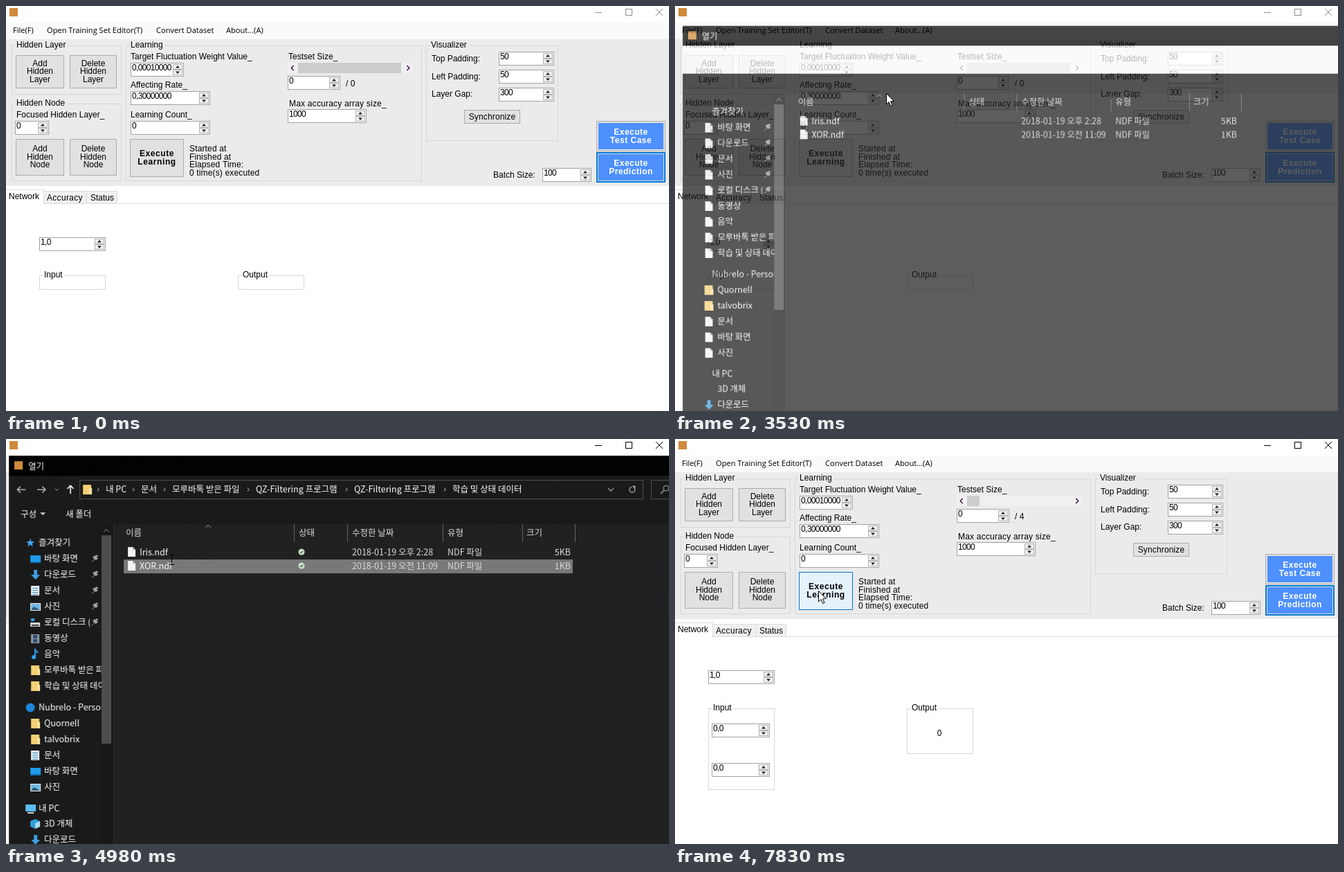
These frames come from a looping animation (958 px wide and 585 px high, 8000 ms). An HTML page with a canvas:

```html
<!DOCTYPE html>
<html lang="ko">
<head>
<meta charset="utf-8">
<title>Trainer</title>
<style>
html, body { margin: 0; width: 100%; height: 100%; overflow: hidden; background: #fff; }
canvas { display: block; }
</style>
</head>
<body>
<canvas id="stage" width="958" height="585"></canvas>
<script>
const LOOP = 8000;
const stage = document.getElementById('stage').getContext('2d');
const sheet = document.createElement('canvas');
sheet.width = 1240;
sheet.height = 760;
const pane = sheet.getContext('2d');
let g = stage;

const FORM = '"Liberation Sans", Arial, sans-serif';
const MENU = '"Open Sans", "Noto Sans", sans-serif';
const KOR = '"Noto Sans CJK KR", "Noto Sans CJK JP", "Noto Sans CJK", sans-serif';
const BLUE = '#0078d7';

// ---------- drawing helpers ----------
function text(s, x, y, o = {}) {
  const size = o.size || 12;
  g.font = `${o.weight || 400} ${size}px ${o.face || FORM}`;
  g.letterSpacing = (o.gap || 0) + 'px';
  g.textAlign = o.align || 'left';
  g.textBaseline = 'alphabetic';
  g.fillStyle = o.color || '#000';
  g.fillText(s, x, y + size * 0.36);
}
const menuText = (s, x, y) => text(s, x, y, { face: MENU, size: 11.1 });
const korText = (s, x, y, color = '#fff', align) => text(s, x, y, { face: KOR, size: 12.5, color, align });

function fill(x, y, w, h, color) {
  g.fillStyle = color;
  g.fillRect(x, y, w, h);
}
function frame(x, y, w, h, color) {
  g.strokeStyle = color;
  g.lineWidth = 1;
  g.strokeRect(x + 0.5, y + 0.5, w - 1, h - 1);
}
function poly(points, color) {
  g.beginPath();
  points.forEach(([x, y]) => g.lineTo(x, y));
  g.closePath();
  g.fillStyle = color;
  g.fill();
}
function path(points, color, width = 1) {
  g.beginPath();
  points.forEach(([x, y]) => g.lineTo(x, y));
  g.strokeStyle = color;
  g.lineWidth = width;
  g.stroke();
}
function disc(x, y, r, color) {
  g.beginPath();
  g.arc(x, y, r, 0, 7);
  g.fillStyle = color;
  g.fill();
}
// dx, dy: direction the chevron points to
function chevron(x, y, dx, dy, r, color, width = 1) {
  path([[x - dx * r / 2 - dy * r, y - dy * r / 2 - dx * r],
        [x + dx * r / 2, y + dy * r / 2],
        [x - dx * r / 2 + dy * r, y - dy * r / 2 + dx * r]], color, width);
}

const clamp = v => Math.min(1, Math.max(0, v));
const span = (t, from, to) => clamp((t - from) / (to - from));
const inside = (p, x, y, w, h) => p && p.x >= x && p.x < x + w && p.y >= y && p.y < y + h;

// ---------- pointer ----------
const track = [
  [160, 891, 588], [520, 470, 300], [860, 66, 80], [930, 62, 50], [1000, 62, 50],
  [1200, 66, 56], [1500, 60, 59], [1770, 32, 37], [1900, 32, 38], [2390, 78, 73],
  [2850, 78, 73], [2930, 75, 62], [3140, 75, 62], [3460, 300, 124], [3530, 305, 126],
  [3870, 232, 189], [4000, 232, 189], [4160, 238, 176], [4450, 238, 176], [4570, 239, 177],
  [5180, 239, 178], [5400, 289, 214], [5650, 289, 214], [5930, 424, 333], [6140, 424, 333],
  [6240, 456, 320], [6340, 491, 337], [6630, 491, 337], [6980, 890, 205], [7120, 888, 200],
  [7430, 818, 222], [7470, 818, 222], [7830, 207, 219], [8000, 207, 219]
];
const clicks = [970, 1820, 3100, 4820];

function slope(i, k) {
  const a = track[i - 1], b = track[i], c = track[i + 1];
  if (!a || !c || (b[k] - a[k]) * (c[k] - b[k]) <= 0) return 0;
  return (c[k] - a[k]) / (c[0] - a[0]);
}
function pointer(t) {
  if (t < 160) return null;
  let i = 0;
  while (i < track.length - 2 && t >= track[i + 1][0]) i++;
  const a = track[i], b = track[i + 1], d = b[0] - a[0], u = span(t, a[0], b[0]);
  const at = k => {
    const ease = u * u * (3 - 2 * u);
    return a[k] + (b[k] - a[k]) * ease
      + d * u * (1 - u) * (slope(i, k) * (1 - u) - slope(i + 1, k) * u);
  };
  return { x: at(1), y: at(2) };
}
function drawPointer(t, p, beam) {
  if (clicks.some(c => t >= c && t < c + 160)) disc(p.x, p.y, 11, 'rgba(255,215,0,.55)');
  g.save();
  g.translate(Math.round(p.x), Math.round(p.y));
  if (beam) {
    path([[-3, -6.5], [0.5, -6.5], [0.5, 7.5], [-3, 7.5]], '#000');
    path([[4, -6.5], [0.5, -6.5], [0.5, 7.5], [4, 7.5]], '#000');
  } else {
    const arrow = [[0.5, 0.5], [0.5, 16], [4, 12.6], [6.6, 18.5], [9, 17.5], [6.5, 11.8], [11.3, 11.5], [0.5, 0.5]];
    poly(arrow, '#fff');
    path(arrow, '#000');
  }
  g.restore();
}

// ---------- form controls ----------
function group(title, x, y, w, h, titleWidth, back) {
  frame(x, y, w, h, '#d8d8d8');
  fill(x + 6, y - 1, titleWidth + 3, 3, back);
  text(title, x + 7, y - 1);
}
function button(lines, x, y, w, h, ys, hover, o = {}) {
  fill(x, y, w, h, hover ? '#e5f1fb' : '#e1e1e1');
  frame(x, y, w, h, hover ? BLUE : '#adadad');
  lines.forEach((s, i) => text(s, x + w / 2, ys[i], { align: 'center', ...o }));
}
function blueButton(lines, y, ys, border, width) {
  fill(853, y, 100, 44, border);
  fill(853 + width, y + width, 100 - 2 * width, 44 - 2 * width, '#e1e1e1');
  fill(856, y + 3, 94, 38, '#4d90fe');
  lines.forEach((s, i) => text(s, 903, ys[i], { align: 'center', color: '#fff', weight: 700, gap: 0.5 }));
}
function field(value, x, y, w) {
  const h = 20, sx = x + w - 16;
  fill(x, y, w, h, '#fff');
  frame(x, y, w, h, '#a2a2a2');
  text(value, x + 2, y + 7, { gap: -0.65 });
  [2, 10].forEach((dy, i) => {
    fill(sx, y + dy, 14, 8, '#f0f0f0');
    frame(sx, y + dy, 14, 8, '#b4b4b4');
    const mx = sx + 7, my = y + dy + 4, d = i ? 1 : -1;
    poly([[mx - 3, my - d * 1.5], [mx + 3, my - d * 1.5], [mx, my + d * 2]], '#222');
  });
}
const fields = [
  ['0', 13, 166, 49], ['0,00010000', 180, 82, 77], ['0,30000000', 180, 123, 115],
  ['0', 180, 166, 115], ['0', 407, 101, 76], ['1000', 407, 149, 114],
  ['50', 712, 66, 80], ['50', 712, 92, 80], ['300', 712, 118, 80],
  ['100', 775, 234, 71], ['1,0', 48, 334, 96]
];
const inputs = [['0,0', 53, 411, 84], ['0,0', 53, 468, 84]];

function tab(label, x, y, w, h, back, tx, ty, gap) {
  fill(x, y, w, h, back);
  frame(x, y, w, h, '#dcdcdc');
  text(label, tx, ty, { gap });
}
function appIcon(x, y) {
  fill(x, y, 12, 12, '#d08a3c');
}

function drawForm(active, loaded, p) {
  const back = '#ebebeb', ink = active ? '#000' : '#8c8c8c';
  fill(0, 0, 958, 585, '#fff');
  appIcon(5, 3);
  path([[851, 9.5], [861, 9.5]], ink);
  frame(895, 4, 10, 10, ink);
  path([[939, 4], [949, 14]], ink);
  path([[949, 4], [939, 14]], ink);

  fill(0, 24, 958, 24, '#fafafa');
  if (inside(p, 2, 26, 48, 20)) {
    fill(2, 26, 48, 20, '#b3d7f3');
    frame(2, 26, 48, 20, BLUE);
  }
  menuText('File(F)', 10, 35);
  menuText('Open Training Set Editor(T)', 59, 35);
  menuText('Convert Dataset', 217, 35);
  menuText('About...(A)', 318, 35);

  fill(0, 48, 958, 212, back);
  group('Hidden Layer', 8, 57, 159, 71, 72, back);
  group('Hidden Node', 8, 141, 159, 112, 71, back);
  group('Learning', 173, 57, 428, 196, 48, back);
  group('Visualizer', 607, 57, 191, 138, 54, back);

  const pair = (verb, x, w, y, h, noun, ys) =>
    button([verb, 'Hidden', noun], x, y, w, h, ys, inside(p, x, y, w, h));
  for (const [verb, x, w] of [['Add', 14, 70], ['Delete', 92, 68]]) {
    pair(verb, x, w, 71, 48, 'Layer', [83, 94, 106]);
    pair(verb, x, w, 192, 53, 'Node', [206, 218, 229]);
  }
  button(['Execute', 'Learning'], 179, 192, 78, 55, [213, 225],
    inside(p, 179, 192, 78, 55), { weight: 700, gap: 0.6 });
  button(['Synchronize'], 662, 150, 81, 20, [160], inside(p, 662, 150, 81, 20), { gap: 0.15 });

  text('Focused Hidden Layer_', 15, 157);
  text('Target Fluctuation Weight Value_', 180, 73);
  text('Affecting Rate_', 180, 114);
  text('Learning Count_', 180, 157);
  text('Testset Size_', 408, 73);
  text('Max accuracy array size_', 409, 141, { gap: 0.2 });
  ['Started at', 'Finished at', 'Elapsed Time:', '0 time(s) executed']
    .forEach((s, i) => text(s, 265, 206 + i * 11.5, { gap: 0.15 }));
  text('Top Padding:', 615, 76);
  text('Left Padding:', 615, 102);
  text('Layer Gap:', 615, 127);
  text('Batch Size:', 704, 244);

  fill(407, 82, 181, 15, '#f0f0f0');
  fill(422, 82, loaded ? 18 : 149, 15, '#cdcdcd');
  chevron(414, 89.5, -1, 0, 3.5, '#4b1a4b', 1.6);
  chevron(581, 89.5, 1, 0, 3.5, '#4b1a4b', 1.6);
  text(loaded ? '/ 4' : '/ 0', 491, 112);

  const overTest = inside(p, 853, 166, 100, 44);
  blueButton(['Execute', 'Test Case'], 166, [182, 194], overTest ? BLUE : '#adadad', 1);
  blueButton(['Execute', 'Prediction'], 211, [227, 239], BLUE, 2);

  fill(0, 285, 958, 1, '#dcdcdc');
  tab('Accuracy', 54, 267, 63, 19, '#f0f0f0', 59, 277, 0.3);
  tab('Status', 116, 267, 45, 19, '#f0f0f0', 122, 277);
  tab('Network', -1, 265, 56, 22, '#fff', 4, 275);
  fill(0, 285, 54, 3, '#fff');

  group('Input', 48, 389, 96, loaded ? 118 : 21, 27, '#fff');
  group('Output', 335, 389, 96, loaded ? 66 : 21, 35, '#fff');
  if (loaded) text('0', 382, 425, { align: 'center' });
  fields.concat(loaded ? inputs : []).forEach(f => field(...f));
}

function drawMenu(p) {
  for (let i = 4; i > 0; i--) fill(4, 48, 179 + i, 91 + i, 'rgba(0,0,0,.07)');
  fill(2, 26, 49, 21, '#fdfdfd');
  frame(2, 26, 49, 21, '#808080');
  fill(2, 46, 181, 92, '#fdfdfd');
  frame(2, 46, 181, 92, '#808080');
  fill(3, 27, 47, 20, '#fdfdfd');
  fill(3, 47, 25, 90, '#f6f6f6');
  fill(33, 112, 148, 1, '#bdbdbd');
  const row = p.y < 46 ? -1 : p.y < 67 ? 0 : 1;
  if (row >= 0) {
    fill(4, 46 + row * 21, 178, 21, '#b3d7f3');
    frame(4, 46 + row * 21, 178, 21, BLUE);
  }
  menuText('File(F)', 10, 35);
  menuText('Open Training Set(O)', 36, 56);
  menuText('Open States Set', 36, 77);
  menuText('Save States Set', 36, 98);
  menuText('Exit(E)', 36, 125);
}

// ---------- file dialog ----------
const icons = {
  page(x, y) {
    poly([[x - 5, y - 7], [x + 2, y - 7], [x + 6, y - 3], [x + 6, y + 7], [x - 5, y + 7]], '#f4f4f4');
    poly([[x + 2, y - 7], [x + 6, y - 3], [x + 2, y - 3]], '#bdbdbd');
  },
  folder(x, y) {
    fill(x - 6, y - 7, 12, 14, '#f3cf74');
    fill(x + 3, y - 2, 4, 9, '#fbe3a0');
  },
  star(x, y) {
    poly(Array.from({ length: 10 }, (_, i) => {
      const a = i * Math.PI / 5, r = i % 2 ? 2.6 : 6.5;
      return [x + r * Math.sin(a), y - r * Math.cos(a)];
    }), '#3fa9f5');
  },
  desk(x, y) {
    fill(x - 7, y - 5, 15, 11, '#1e9be9');
    fill(x - 7, y + 4, 15, 2, '#0f6fb8');
  },
  down(x, y) {
    poly([[x - 2, y - 7], [x + 3, y - 7], [x + 3, y], [x + 7, y], [x + 0.5, y + 7], [x - 6, y], [x - 2, y]], '#3f9fe0');
  },
  doc(x, y) {
    fill(x - 6, y - 7, 12, 14, '#eef4f8');
    for (let i = 0; i < 4; i++) fill(x - 4, y - 4 + i * 3, 8, 1, '#2f7fae');
  },
  photo(x, y) {
    fill(x - 7, y - 5, 15, 11, '#f2f2f2');
    fill(x - 6, y - 4, 13, 9, '#6db7e4');
    poly([[x - 6, y + 5], [x - 2, y], [x + 7, y + 5]], '#2a566f');
  },
  disk(x, y) {
    fill(x - 7, y, 14, 6, '#d5d9dc');
    fill(x - 5, y + 3, 10, 2, '#3b4248');
    fill(x - 6, y - 6, 5, 4, '#33a3ea');
  },
  film(x, y) {
    fill(x - 6, y - 6, 12, 13, '#8d99a3');
    fill(x - 3, y - 5, 6, 5, '#2c4d74');
    fill(x - 3, y + 1, 6, 5, '#2c4d74');
  },
  note(x, y) {
    disc(x - 2, y + 4, 3, '#2fa0ee');
    path([[x, y + 4], [x, y - 7], [x + 4, y - 2]], '#2fa0ee', 2);
  },
  ball(x, y) { disc(x, y, 6.5, '#1d86d8'); },
  screen(x, y) {
    fill(x - 7, y - 6, 15, 10, '#5cbcf0');
    fill(x - 4, y + 5, 9, 2, '#cfd6da');
  },
  cube(x, y) {
    poly([[x, y - 7], [x + 7, y - 4], [x + 7, y + 4], [x, y + 7], [x - 7, y + 4], [x - 7, y - 4]], '#2f9fd8');
    poly([[x, y - 1], [x + 7, y - 4], [x + 7, y + 4], [x, y + 7]], '#a9dcf4');
  }
};
const tree = [
  [149, '즐겨찾기', 'star', 1], [172, '바탕 화면', 'desk'], [195, '다운로드', 'down'], [218, '문서', 'doc'],
  [241, '사진', 'photo'], [264, '로컬 디스크 (C:)', 'disk'], [287, '동영상', 'film'], [310, '음악', 'note'],
  [333, '모루바톡 받은 파일', 'folder'], [356, '학습 및 상태 데이터', 'folder'],
  [387, 'Nubrelo - Personal', 'ball', 1], [410, 'Quornell', 'folder'], [433, 'talvobrix', 'folder'],
  [456, '문서', 'doc'], [479, '바탕 화면', 'desk'], [502, '사진', 'photo'],
  [533, '내 PC', 'screen', 1], [555, '3D 개체', 'cube'], [578, '다운로드', 'down'], [601, '동영상', 'film']
];
const crumbs = [[144, '내 PC'], [195, '문서'], [240, '모루바톡 받은 파일'], [361, 'QZ-Filtering 프로그램'],
  [503, 'QZ-Filtering 프로그램'], [645, '학습 및 상태 데이터']];

function drawToolbar() {
  fill(4, 53, 1236, 70, '#191919');
  path([[28, 73], [17, 73]], '#ccc', 1.3);
  chevron(18.5, 73, -1, 0, 4.5, '#ccc', 1.3);
  path([[45, 73], [56, 73]], '#ccc', 1.3);
  chevron(54.5, 73, 1, 0, 4.5, '#ccc', 1.3);
  chevron(73, 73, 0, 1, 2.5, '#aaa');
  path([[93, 79], [93, 68]], '#fff', 1.6);
  chevron(93, 69.5, 0, -1, 4.5, '#fff', 1.6);
  frame(106, 59, 815, 28, '#535353');
  icons.folder(117, 73);
  crumbs.forEach(([x, s]) => {
    chevron(x - 11, 73, 1, 0, 2.5, '#ccc');
    korText(s, x, 72);
  });
  chevron(874, 73, 0, 1, 4, '#999', 1.4);
  g.beginPath();
  g.arc(905, 73, 4, -0.6, 4.6);
  g.strokeStyle = '#aaa';
  g.lineWidth = 1.3;
  g.stroke();
  poly([[905, 67], [910, 68], [908, 72]], '#aaa');
  frame(932, 59, 250, 28, '#535353');
  g.beginPath();
  g.arc(954, 71, 4, 0, 7);
  g.strokeStyle = '#aaa';
  g.stroke();
  path([[951, 74], [946, 79]], '#aaa', 1.3);
  korText('구성', 21, 108);
  poly([[49, 106], [57, 106], [53, 110]], '#ccc');
  korText('새 폴더', 86, 108);
}

function drawTree(ready) {
  fill(4, 123, 151, 637, '#191919');
  g.save();
  g.beginPath();
  g.rect(4, 123, 134, 637);
  g.clip();
  tree.forEach(([y, label, icon, top], i) => {
    const x = top ? 35 : 42;
    if (ready) icons[icon](x, y + 1);
    else if (!top && label !== '3D 개체') {
      icons[i === 11 || i === 12 ? 'folder' : i > 17 ? 'down' : 'page'](x, y + 1);
    }
    korText(label, top ? 47 : 55, y);
    if (i > 0 && i < 6) {
      fill(121, y - 7, 17, 14, '#191919');
      poly([[128, y - 4], [133, y + 1], [129, y + 3], [125, y - 1]], '#a5a5a5');
      path([[127, y + 2], [124, y + 5]], '#a5a5a5');
      path([[130, y - 2], [132, y - 4]], '#a5a5a5', 3);
    }
  });
  g.restore();
  fill(138, 123, 15, 637, '#171717');
  fill(138, 139, 14, 301, '#4d4d4d');
  chevron(145, 132, 0, -1, 3.5, '#999');
  fill(155, 123, 1, 637, '#2b2b2b');
}

function drawDialog(ready, p, chosen) {
  g = pane;
  g.clearRect(0, 0, 1240, 760);
  fill(4, 24, 1236, 736, '#202020');
  fill(4, 24, 1236, 29, '#000');
  appIcon(12, 32);
  korText('열기', 32, 39);
  if (ready) drawToolbar();
  else {
    fill(4, 53, 1236, 41, '#fff');
    fill(4, 94, 1236, 29, '#191919');
  }
  drawTree(ready);

  [[173, '이름'], [423, '상태'], [500, '수정한 날짜'], [638, '유형'], [752, '크기']]
    .forEach(([x, s]) => korText(s, x, 135, '#dedede'));
  [416, 493, 631, 746, 822].forEach(x => fill(x, 123, 1, 26, '#626262'));
  chevron(292, 126, 0, -1, 3.5, '#aaa');
  [[163, 'Iris.ndf', '오후 2:28', '5KB'], [183, 'XOR.ndf', '오전 11:09', '1KB']].forEach(([y, name, time, size], i) => {
    const hover = ready && inside(p, 170, y - 10, 649, 20);
    if (hover) fill(170, y - 9, 649, 20, chosen && i ? '#777' : '#4d4d4d');
    icons.page(181, y);
    korText(name, 193, y);
    if (ready) {
      disc(427, y, 4.5, '#d3e6d0');
      path([[425, y], [426.5, y + 1.7], [429.3, y - 1.6]], '#2c5a34', 1.2);
    }
    korText('2018-01-19 ' + time, 500, y, '#dedede');
    korText('NDF 파일', 638, y, '#dedede');
    korText(size, 816, y, '#dedede', 'right');
  });
  g = stage;
}
function placeDialog(scale, alpha) {
  const cx = 520, cy = 365;
  g.save();
  g.globalAlpha = alpha;
  g.translate(cx, cy);
  g.scale(scale, scale);
  g.drawImage(sheet, -cx, -cy);
  g.restore();
}

// ---------- timeline ----------
const OPEN = 3450, CLOSE = 4980, CLOSED = 5131;

function render(t) {
  const p = pointer(t);
  const menu = t >= 1820 && t < 3220;
  const dialog = t >= OPEN && t < CLOSED;
  const modal = t >= OPEN && t < CLOSE;
  const free = menu || modal ? null : p;
  const loaded = t >= 4900;

  drawForm(t >= 970 && !modal, loaded, free);
  if (menu) {
    g.globalAlpha = span(t, 1780, 1940) * (1 - span(t, 3100, 3220));
    drawMenu(p);
    g.globalAlpha = 1;
  }
  if (dialog) {
    drawDialog(t >= 3660, p, t >= 4820);
    const rest = (1 - span(t, OPEN, OPEN + 170)) ** 2;
    const gone = span(t, CLOSE, CLOSED);
    placeDialog(1 - 0.05 * rest - 0.0485 * gone, (1 - rest) * (1 - gone));
  }
  if (p) {
    const editable = fields.concat(loaded ? inputs : []);
    const beam = editable.some(([, x, y, w]) => inside(free, x, y, w - 16, 20));
    drawPointer(t, p, beam);
  }
}

const start = performance.now();
function tick() {
  render((performance.now() - start) % LOOP);
  requestAnimationFrame(tick);
}
tick();
</script>
</body>
</html>
```
